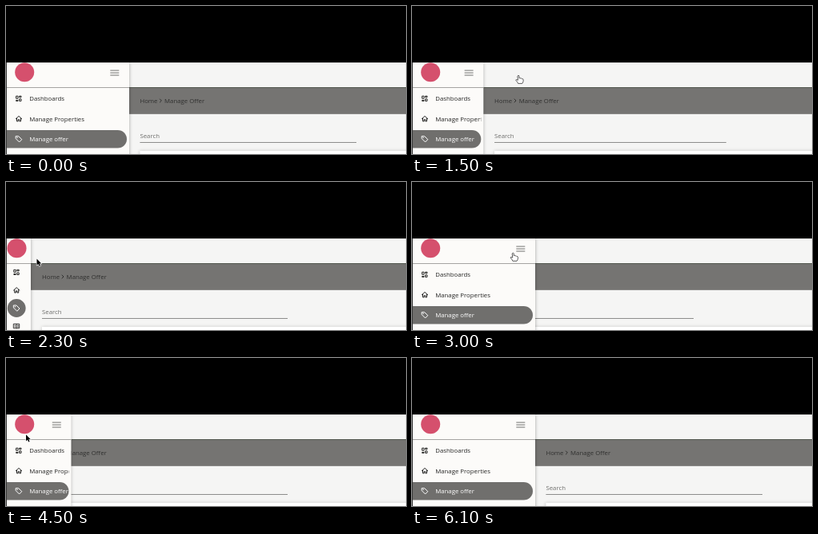
Write an HTML page with a canvas that moves like this. It is 500 px wide and 186 px high and loops after 6.2 s.

```html
<!DOCTYPE html>
<html lang="en">
<head>
<meta charset="utf-8">
<title>Collapsing sidebar</title>
<style>
  html, body { margin: 0; width: 100%; height: 100%; overflow: hidden; background: #000; }
  canvas { display: block; width: 500px; height: 186px; }
</style>
</head>
<body>
<canvas id="stage"></canvas>
<script>
const W = 500, H = 186, TOP = 71, LOOP = 6200, STEP = 100;
const canvas = document.getElementById('stage');
const ctx = canvas.getContext('2d');
const ratio = window.devicePixelRatio || 1;
canvas.width = W * ratio;
canvas.height = H * ratio;

const mix = (a, b, p) => a + (b - a) * p;
const ramp = (t, from, to) => {
  const p = Math.min(1, Math.max(0, (t - from) / (to - from)));
  return p * p * (3 - 2 * p);
};

// Hovering opens only the menu; clicking the burger also moves the page.
const menuOpen = t => 1 - ramp(t, 1350, 1640) + ramp(t, 2320, 2620)
  - ramp(t, 4040, 4300) + ramp(t, 4368, 4668);
const pageOpen = t => 1 - ramp(t, 1350, 1640) + ramp(t, 3220, 3500)
  - ramp(t, 4040, 4300) + ramp(t, 5220, 5500);

// time, x, y of the pointer tip
const pointerPath = [
  [500, 150, 52], [900, 131, 92], [1080, 131, 92], [1250, 133, 87],
  [2030, 133, 87], [2380, 24, 98], [2550, 24, 100], [2980, 126, 89],
  [3150, 134, 86], [4250, 134, 86], [4450, 25, 96], [4620, 25, 97],
  [5120, 134, 86], [5550, 134, 86], [5950, 150, 52]
];

function pointerAt(t) {
  const i = pointerPath.findIndex(k => k[0] >= t);
  if (i < 1) return null;
  const [t0, x0, y0] = pointerPath[i - 1];
  const [t1, x1, y1] = pointerPath[i];
  const p = ramp(t, t0, t1);
  return [mix(x0, x1, p), mix(y0, y1, p)];
}

function rect(x, y, w, h, color) {
  ctx.fillStyle = color;
  ctx.fillRect(x, y, w, h);
}

function text(label, x, y, color) {
  ctx.font = '7.8px "Open Sans", sans-serif';
  ctx.textBaseline = 'alphabetic';
  ctx.fillStyle = color;
  ctx.fillText(label, x, y);
}

function stroke(path, color, width = 1) {
  ctx.strokeStyle = color;
  ctx.lineWidth = width;
  ctx.lineJoin = ctx.lineCap = 'round';
  ctx.stroke(new Path2D(path));
}

function at(x, y, draw) {
  ctx.save();
  ctx.translate(x, y);
  draw();
  ctx.restore();
}

const icons = {
  grid(color) {
    stroke('M-3 -3h2v3h-2z M1 -3h2v1.5h-2z M1 .7h2v2.5h-2z M-3 2.2h2v1h-2z', color);
  },
  home(color) {
    stroke('M-3.7 .2L0 -3.3L3.7 .2 M-2.5 -.5V3.2H-.8V1H.8V3.2H2.5V-.5', color);
  },
  tag(color) {
    stroke('M-3.5 -3.5H-.3L3.8 .5L.6 3.8L-3.5 -.3Z', color);
    rect(-2.4, -2.4, 1.2, 1.2, color);
  },
  board(color) {
    stroke('M-3.5 -2.7h7v5.4h-7z M0 -2.7v5.4 M-2.2 -.8h1 M1.5 -.8h1 M-2.2 1h1 M1.5 1h1', color, .9);
  }
};

const items = [
  { icon: 'grid', label: 'Dashboards' },
  { icon: 'home', label: 'Manage Properties' },
  { icon: 'tag', label: 'Manage offer', active: true },
  { icon: 'board', label: '' }
];

function drawPage(open) {
  const left = mix(45, 167.4, open);
  const right = mix(352, 438, open);
  rect(0, TOP, W, H - TOP, '#f5f5f4');
  rect(0, 102, W, 34, '#757472');
  rect(0, 102, W, 1, '#52584f');
  rect(0, 135, W, 1, '#8a8987');
  text('Home', left, 121.8, '#30302f');
  at(left + 26, 119, () => stroke('M-1 -2L1 0L-1 2', '#30302f', 1));
  text('Manage Offer', left + 30.6, 121.8, '#30302f');
  text('Search', left, 166.4, '#6d6d6b');
  rect(left, 171, right - left, 1, '#8d8d8b');

  ctx.save();
  ctx.shadowColor = 'rgba(0,0,0,.2)';
  ctx.shadowBlur = 4 * ratio;
  rect(left, 182, W, 20, '#fff');
  ctx.restore();
}

function drawMenu(open) {
  const width = mix(31, 154, open);
  const mini = width < 40;

  ctx.save();
  ctx.shadowColor = 'rgba(0,0,0,.35)';
  ctx.shadowBlur = 4 * ratio;
  rect(0, TOP, width, H, '#fcfbf9');
  ctx.restore();

  ctx.save();
  ctx.beginPath();
  ctx.rect(0, TOP, width, H - TOP);
  ctx.clip();
  rect(0, 102, width, 1, '#a5a4a2');

  ctx.fillStyle = '#d5506d';
  ctx.beginPath();
  ctx.arc(mini ? 13.5 : 23.2, 83.3, 12, 0, Math.PI * 2);
  ctx.fill();

  if (!mini) {
    for (const y of [80.5, 83.5, 86.5]) rect(width - 23.7, y, 11, 1, '#737371');
  }

  items.forEach((item, i) => {
    const x = mini ? 13.2 : 16;
    const y = mini ? 113.3 + i * 22.6 : 116.2 + i * 25.5;
    const color = item.active ? '#fff' : '#252524';
    if (item.active) {
      ctx.fillStyle = '#706f6d';
      ctx.beginPath();
      if (mini) ctx.arc(x, y, 11.4, 0, Math.PI * 2);
      else ctx.roundRect(0, y - 11.3, width - 3, 22.6, [0, 11.3, 11.3, 0]);
      ctx.fill();
    }
    at(x, y, () => icons[item.icon](color));
    if (mini) return;
    ctx.save();
    ctx.beginPath();
    ctx.rect(0, y - 12, width - 3, 24);
    ctx.clip();
    text(item.label, 29.2, y + 2.8, color);
    ctx.restore();
  });
  ctx.restore();
  rect(0, TOP, 1, H - TOP, '#3a3a39');
}

function drawPointer([x, y]) {
  at(x, y, () => {
    if (x > 115) {
      const hand = 'M-.9 .8Q0 -.8 .9 .8V3.6Q2 2.8 2.8 4Q4 3.4 4.6 4.6Q6 4.2 6.1 5.6V7.4Q5.8 9 4.8 10.4H-.4Q-1 8.5 -3.3 6.2Q-3.5 4.7 -.9 6Z';
      ctx.fillStyle = '#fff';
      ctx.fill(new Path2D(hand));
      stroke(hand, '#4a4a4a', .9);
    } else {
      const arrow = 'M0 0V8.2L1.9 6.5L3.2 9.3L4.6 8.7L3.3 6H5.8Z';
      stroke(arrow, '#fff', 1.2);
      ctx.fillStyle = '#000';
      ctx.fill(new Path2D(arrow));
    }
  });
}

function draw(t) {
  ctx.setTransform(ratio, 0, 0, ratio, 0, 0);
  rect(0, 0, W, H, '#000');
  ctx.save();
  ctx.beginPath();
  ctx.rect(0, TOP, W, H - TOP);
  ctx.clip();
  drawPage(pageOpen(t));
  drawMenu(menuOpen(t));
  const pointer = pointerAt(t);
  if (pointer) drawPointer(pointer);
  ctx.restore();
}

const start = performance.now();
function tick() {
  const elapsed = (performance.now() - start) % LOOP;
  draw(Math.floor(elapsed / STEP) * STEP);
  requestAnimationFrame(tick);
}
tick();
</script>
</body>
</html>
```
